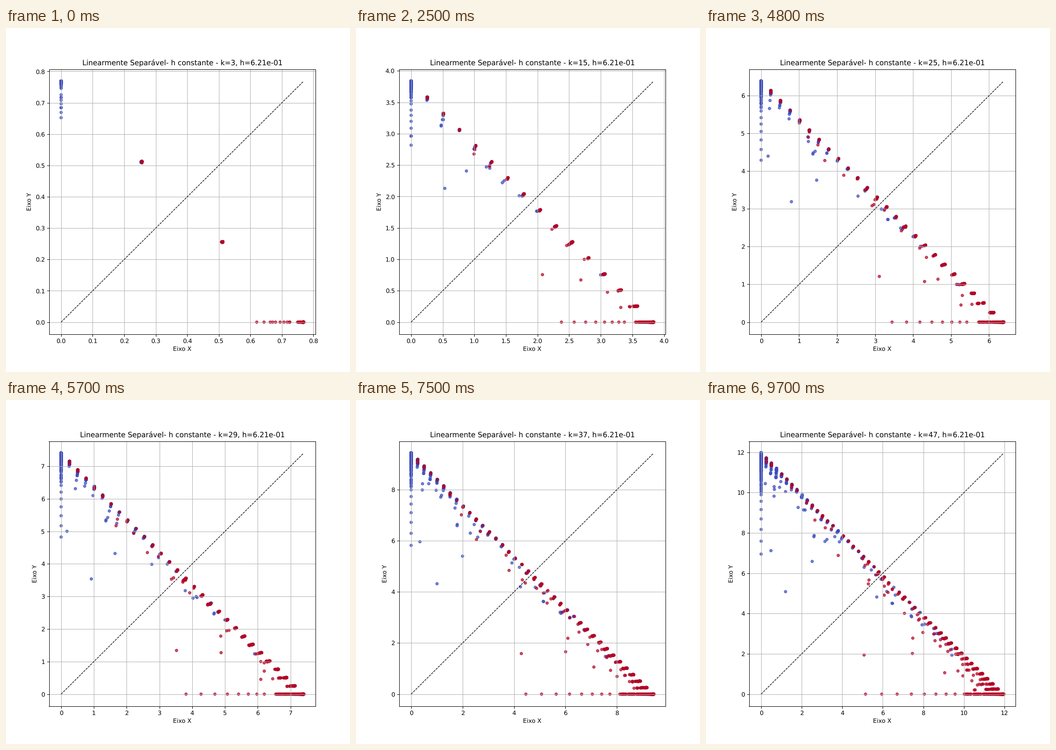
Recreate the animation shown at these times as a matplotlib script. Size 748 by 748 pixels, loop 10 s.

```python
import numpy as np
import matplotlib.pyplot as plt
from matplotlib.animation import FuncAnimation

H = 0.621                      # kernel bandwidth
PEAK = 1 / (2 * np.pi * H)     # kernel height at distance zero
K_VALUES = np.arange(3, 48, 2)
K_MAX = K_VALUES[-1]
PER_CLASS, SPREAD, GAP = 1100, 0.385, 1.17


def cluster_sums():
    """Kernel sums per class over the nearest neighbours, for every k."""
    rng = np.random.default_rng(7)
    labels = np.repeat([0, 1], PER_CLASS)
    points = rng.normal(0, SPREAD, (2 * PER_CLASS, 2))
    points[:, 0] += GAP * (labels - 0.5)
    norms = (points ** 2).sum(axis=1)
    dist2 = np.maximum(norms[:, None] + norms - 2 * points @ points.T, 0)
    np.fill_diagonal(dist2, 0)
    near = np.argsort(dist2, axis=1)[:, :K_MAX]
    weights = PEAK * np.exp(-np.take_along_axis(dist2, near, 1) / (2 * H * H))
    red = np.cumsum(weights * labels[near], axis=1)
    blue = np.cumsum(weights * (1 - labels[near]), axis=1)
    dense = (red + blue)[:, -1] > 0.82 * PEAK * K_MAX
    columns = K_VALUES - 1
    return labels[dense], red[dense][:, columns], blue[dense][:, columns]


def outlier(label, loss, minority=0):
    """Kernel sums of an isolated point: log weight falls with sqrt(k)."""
    weight = PEAK * np.exp(-loss * np.sqrt(K_VALUES / K_MAX))
    others = np.floor(minority * K_VALUES)
    sums = weight * others, weight * (K_VALUES - others)
    return (label, *(sums if label == 0 else sums[::-1]))


def outlier_sums():
    outliers = [outlier(0, 0.55 * 0.84 ** i) for i in range(6)]
    outliers += [outlier(1, 0.85 * 0.83 ** i) for i in range(8)]
    outliers += [outlier(0, 0.65, 0.21), outlier(0, 0.46, 0.065),
                 outlier(0, 0.28, 0.28), outlier(1, 0.54, 0.28),
                 outlier(1, 0.24, 0.23)]
    return [np.array(part) for part in zip(*outliers)]


labels, xs, ys = (np.concatenate(pair)
                  for pair in zip(cluster_sums(), outlier_sums()))
order = np.argsort(labels, kind="stable")   # red is drawn over blue
labels, xs, ys = labels[order], xs[order], ys[order]

plt.rcParams["font.family"] = "DejaVu Sans"
plt.rcParams["text.hinting"] = "no_hinting"
fig, ax = plt.subplots(figsize=(8, 8), dpi=93.5)
dots = ax.scatter(xs[:, 0], ys[:, 0], c=labels, cmap="coolwarm", s=20, alpha=0.7)
diagonal, = ax.plot([], [], "k--", lw=1)
title = ax.set_title("")
ax.set_xlabel("Eixo X")
ax.set_ylabel("Eixo Y")
ax.grid(True)


def update(frame):
    step = (frame * 100 + 200) // 450
    k = K_VALUES[step]
    top = PEAK * k * np.exp(-0.00017 * k)
    dots.set_offsets(np.column_stack([xs[:, step], ys[:, step]]))
    diagonal.set_data([0, top], [0, top])
    ax.set_xlim(-0.05 * top, 1.05 * top)
    ax.set_ylim(-0.05 * top, 1.05 * top)
    title.set_text(f"Linearmente Separável- h constante - k={k}, h={H:.2e}")
    return dots, diagonal, title


anim = FuncAnimation(fig, update, frames=100, interval=100, repeat=True,
                     repeat_delay=0, blit=False)
plt.show()
```
